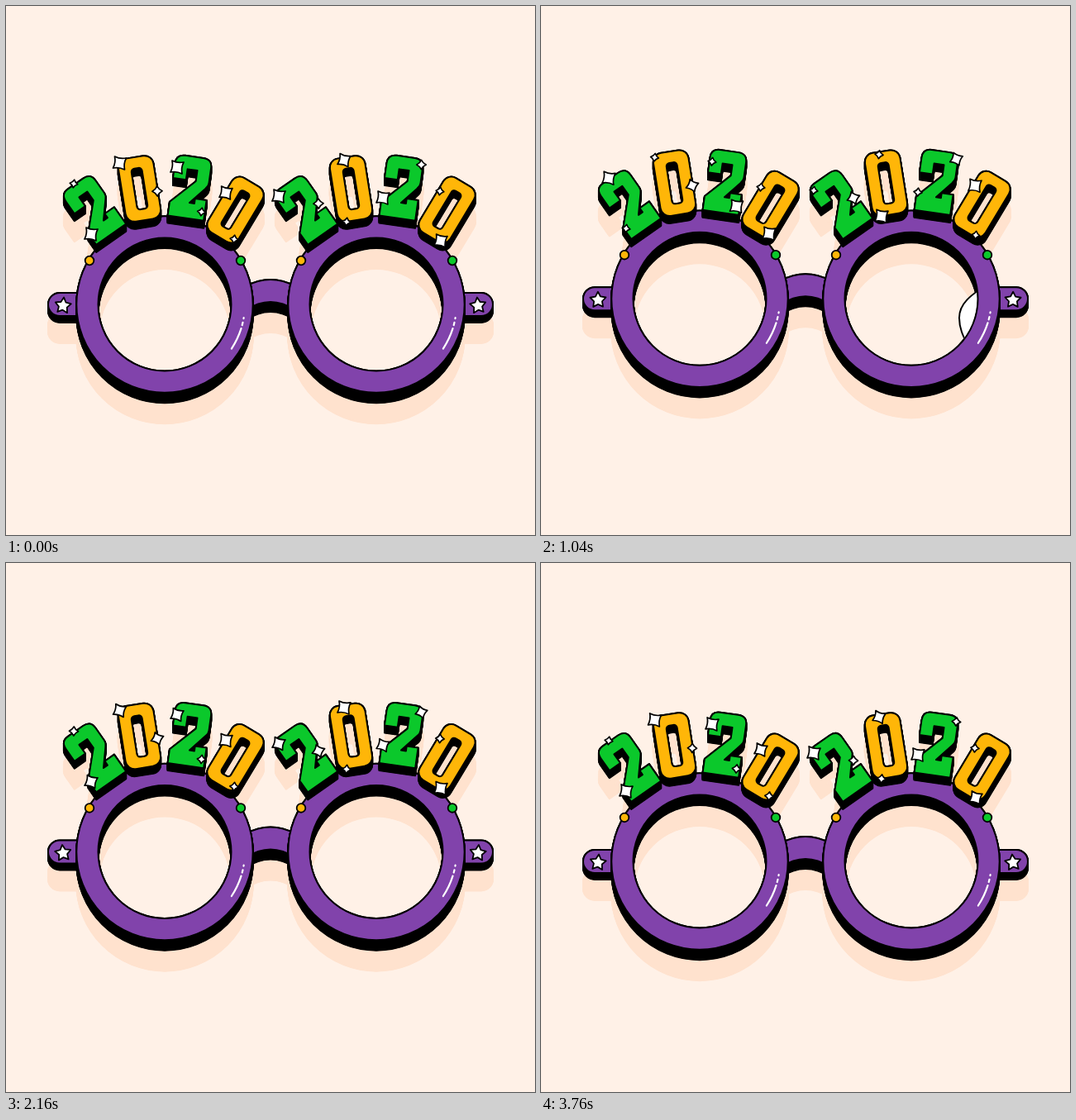
An HTML page with a canvas that plays this animation: 640x640 px, repeating every 3840 ms.

```html
<!DOCTYPE html>
<html lang="en">
<head>
<meta charset="utf-8">
<title>Party glasses</title>
<style>
  html, body { margin: 0; width: 100%; height: 100%; overflow: hidden; background: #fff1e7; }
  canvas { display: block; width: 640px; height: 640px; }
</style>
</head>
<body>
<canvas id="stage" width="640" height="640"></canvas>
<script>
const ctx = document.getElementById('stage').getContext('2d');
const LOOP = 3840, STEP = 80, TAU = Math.PI * 2;
const BACK = '#fff1e7', SHADE = '#ffe2ce', INK = '#000', WHITE = '#fff';
const PURPLE = '#8143ab', GREEN = '#0bc82b', ORANGE = '#ffb608';
const RING_Y = 355, LENS_X = [192, 448], OUTER = 106.7, INNER = 80.5;
const rad = deg => deg * Math.PI / 180;

function ringPath(x) {
  const p = new Path2D();
  p.arc(x, RING_Y, OUTER, 0, TAU);
  p.closePath();
  p.moveTo(x + INNER, RING_Y);
  p.arc(x, RING_Y, INNER, 0, TAU);
  p.closePath();
  return p;
}

function templePath(left) {
  const p = new Path2D();
  if (left) p.roundRect(51, 341, 45, 28, [14, 0, 0, 14]);
  else p.roundRect(544, 341, 45, 28, [0, 14, 14, 0]);
  return p;
}

function zeroPath() {
  const p = new Path2D();
  p.roundRect(-21.5, -38.5, 43, 77, 11);
  p.roundRect(-6.5, -25, 13, 50, 4);
  return p;
}

const TWO = new Path2D(`M-22 -9 V-27 Q-22 -38 -11 -38 H11 Q22 -38 22 -27 V-9
  Q22 -5 19 -2 L2 18 H8 V12 H22 V37 H-22 V20 L6 -9 V-22 H-6 V-9 Z`);
const ZERO = zeroPath();

function place(shape, x, y, deg) {
  const p = new Path2D();
  p.addPath(shape, new DOMMatrix().translate(x, y).rotate(deg));
  return p;
}

const frame = [
  { path: templePath(true), depth: 8, color: PURPLE },
  { path: templePath(false), depth: 8, color: PURPLE },
  { path: new Path2D('M290 333 Q320 317 350 333 V362 Q320 342 290 362 Z'), depth: 12, color: PURPLE },
  ...LENS_X.map(x => ({ path: ringPath(x), depth: 12.5, color: PURPLE }))
];
const digits = LENS_X.flatMap(x => [
  [TWO, -86, 240, -35, GREEN], [ZERO, -30.5, 215, -9, ORANGE],
  [TWO, 30.5, 214, 8, GREEN], [ZERO, 85.5, 240.5, 31, ORANGE]
].map(([shape, dx, y, deg, color]) => ({ path: place(shape, x + dx, y, deg), depth: 9, color })));

function extrude({ path, depth }, color) {
  ctx.fillStyle = ctx.strokeStyle = color;
  ctx.lineWidth = 2;
  for (let k = 0; k <= depth; k += 0.5) {
    ctx.save();
    ctx.translate(0, k);
    ctx.fill(path, 'evenodd');
    ctx.stroke(path);
    ctx.restore();
  }
}

function paint(path, fill, width) {
  ctx.fillStyle = fill;
  ctx.strokeStyle = INK;
  ctx.lineWidth = width;
  ctx.fill(path, 'evenodd');
  ctx.stroke(path);
}

function drawSolid(solid) {
  extrude(solid, INK);
  paint(solid.path, solid.color, 2);
}

// Reflection sweeping across both lenses
const GLEAM = new Path2D(`M64 255 C72 285 72 305 47 328 C25 345 0 355 0 378
  C0 400 14 412 20 436 L24 450 L51 450 L47 434 C42 420 36 415 38 405
  C44 378 100 372 100 320 C100 298 86 285 78 255 Z`);
const SWEEPS = [
  [[120, 0], [640, 238], [1040, 295], [1240, 340]],
  [[2160, 0], [2560, 183], [2920, 340]]
];

function gleamX(t) {
  for (const keys of SWEEPS) {
    for (let i = 1; i < keys.length; i++) {
      const [t0, x0] = keys[i - 1], [t1, x1] = keys[i];
      if (t >= t0 && t < t1) return x0 + (x1 - x0) * (t - t0) / (t1 - t0);
    }
  }
  return null;
}

function drawGleam(t) {
  const x = gleamX(t);
  if (x === null) return;
  LENS_X.forEach((cx, i) => {
    ctx.save();
    ctx.beginPath();
    ctx.arc(cx, RING_Y, INNER - 1, 0, TAU);
    ctx.clip();
    ctx.translate(x + i * 211, 0);
    paint(GLEAM, WHITE, 2);
    ctx.restore();
  });
}

function drawStar(x, y, turn) {
  const p = new Path2D();
  for (let i = 0; i < 10; i++) {
    const r = i % 2 ? 5.2 : 10, a = i * TAU / 10 - TAU / 4 + turn;
    p.lineTo(x + r * Math.cos(a), y + r * Math.sin(a));
  }
  p.closePath();
  paint(p, WHITE, 1.8);
}

function drawBead(x, y, color) {
  const p = new Path2D();
  p.arc(x, y, 5.3, 0, TAU);
  paint(p, color, 1.8);
}

function drawShine(cx) {
  ctx.strokeStyle = WHITE;
  ctx.lineWidth = 2.2;
  for (const [from, to] of [[17.5, 33.5], [13, 15], [9.6, 10.2]]) {
    ctx.beginPath();
    ctx.arc(cx, RING_Y, 97, rad(from), rad(to));
    ctx.stroke();
  }
}

// x, y, pulse phase in degrees
const SPARKLES = [
  [82, 209, 180], [103, 270, 0], [137.5, 184, 0], [183, 218, 120],
  [207, 189, 0], [236.5, 243, 195], [266, 220, 30], [276, 276, 195],
  [330, 224, 0], [378, 233, 120], [409, 180.5, 40], [412, 255, 195],
  [456, 226, -10], [502.5, 186, 130], [525, 218, 190], [526, 278, 30]
];

function drawSparkle([x, y, phase], t) {
  const pulse = Math.cos(t / LOOP * 2 * TAU - rad(phase));
  const r = 7.4 + 2.6 * pulse, turn = rad(76 - 23 * pulse);
  const at = (a, d) => [x + d * Math.cos(a), y + d * Math.sin(a)];
  const p = new Path2D();
  p.moveTo(...at(turn, r));
  for (let i = 1; i <= 4; i++) {
    const a = turn + i * TAU / 4;
    p.quadraticCurveTo(...at(a - TAU / 8, r * 0.45), ...at(a, r));
  }
  p.closePath();
  paint(p, WHITE, 1.7);
}

function draw(t) {
  const wave = Math.cos(t / LOOP * TAU);
  ctx.fillStyle = BACK;
  ctx.fillRect(0, 0, 640, 640);
  ctx.save();
  ctx.lineJoin = ctx.lineCap = 'round';
  ctx.translate(0, 6 * wave);

  ctx.save();
  ctx.translate(0, 25);
  [...frame, ...digits].forEach(s => extrude(s, SHADE));
  ctx.restore();

  frame.forEach(drawSolid);
  drawGleam(t);
  for (const cx of LENS_X) {
    drawShine(cx);
    drawBead(cx - 91, 302, ORANGE);
    drawBead(cx + 92, 302, GREEN);
  }
  digits.forEach(drawSolid);
  drawStar(69, 356.5, rad(6 * wave));
  drawStar(571, 356.5, rad(-6 * wave));
  SPARKLES.forEach(s => drawSparkle(s, t));
  ctx.restore();
}

const start = performance.now();
function tick() {
  const t = (performance.now() - start) % LOOP;
  draw(Math.floor(t / STEP) * STEP);
  requestAnimationFrame(tick);
}
tick();
</script>
</body>
</html>
```
